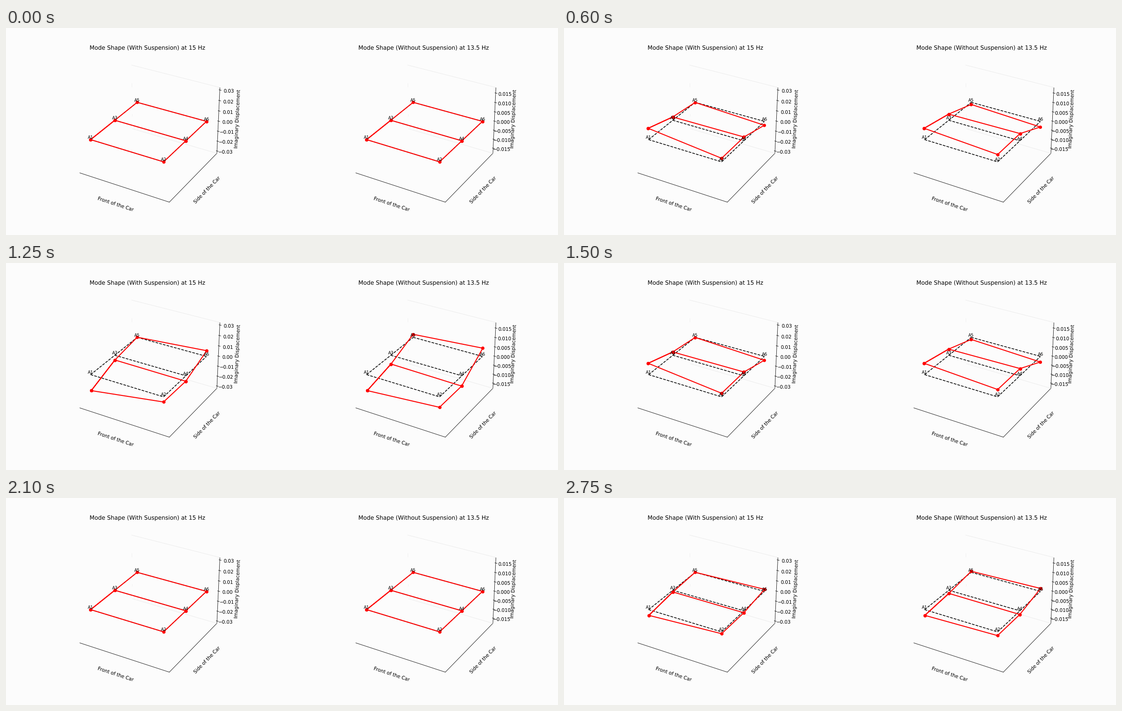
Recreate the animation shown at these times as a matplotlib script. Size 1222 by 458 pixels, loop 2.8 s.

```python
import numpy as np
import matplotlib.pyplot as plt
from matplotlib.animation import FuncAnimation

DPI = 76.375
BACK = "#fcfcfc"
FRAMES, PERIOD = 56, 28

# Unhinted glyphs keep their true advance widths at this low resolution
plt.rcParams.update({"font.family": "DejaVu Sans",
                     "text.hinting": "no_hinting"})

# Sensor grid: A1..A6, two per row from front to back
X = np.array([0, 1, 0, 1, 0, 1])
Y = np.array([0, 0, 1, 1, 2, 2])
FRAME_PATH = [0, 1, 3, 2, 0, 2, 4, 5, 3]
REST_EDGES = [(0, 1), (2, 3), (4, 5), (0, 2), (1, 3), (2, 4), (3, 5)]

# title, shape, z limit, tick step
MODES = [
    ("Mode Shape (With Suspension) at 15 Hz",
     [0.0249, 0.0077, 0.0075, 0.0084, -0.0002, -0.0089], 0.0324, 0.01),
    ("Mode Shape (Without Suspension) at 13.5 Hz",
     [0.01375, 0.0087, 0.0077, 0.0088, -0.0027, -0.0071], 0.0179, 0.005),
]


def padded(lo, hi):
    pad = (hi - lo) / 48
    return lo - pad, hi + pad


def draw_back_edges(ax, xlim, y, zmax):
    def edge(xs, zs, color):
        ax.plot(xs, [y, y], zs, color=color, lw=0.8, zorder=0)

    for z in (-zmax, zmax):
        edge(xlim, [z, z], "#e9e9e9")
    for top, bottom in ((0.44, 0.33), (-0.53, -0.59)):
        edge([xlim[0]] * 2, [top * zmax, bottom * zmax], "#eeeeee")


def make_axes(fig, col, title, zmax, step):
    ax = fig.add_axes((0.0625 + 0.5 * col, 0.11, 0.3875, 0.77),
                      projection="3d", facecolor="none")
    ax.view_init(elev=30, azim=-60)
    ax.set_title(title)
    ax.set_xlabel("Front of the Car")
    ax.set_ylabel("Side of the Car")
    ax.set_zlabel("Imaginary Displacement")
    ax.grid(False)
    for axis in (ax.xaxis, ax.yaxis, ax.zaxis):
        axis.set_pane_color((1, 1, 1, 0))

    xlim, ylim = padded(-0.1, 1.1), padded(-0.1, 2.1)
    draw_back_edges(ax, xlim, ylim[1], zmax)
    for a, b in REST_EDGES:
        ax.plot([X[a], X[b]], [Y[a], Y[b]], [0, 0], "k--", lw=1.5)
    for i in range(len(X)):
        ax.text(X[i], Y[i], 0, f"A{i + 1}", fontsize=9,
                ha="center", va="bottom")
    line, = ax.plot(X[FRAME_PATH], Y[FRAME_PATH], np.zeros(len(FRAME_PATH)),
                    "ro-", lw=2)

    ax.set_xticks([])
    ax.set_yticks([])
    ax.set_zticks(np.arange(-3, 4) * step)
    ax.set_xlim(*xlim)
    ax.set_ylim(*ylim)
    ax.set_zlim(-zmax, zmax)
    return line


fig = plt.figure(figsize=(16, 6), dpi=DPI, facecolor=BACK)
parts = [(make_axes(fig, col, title, zmax, step), np.array(shape))
         for col, (title, shape, zmax, step) in enumerate(MODES)]


def update(i):
    swing = np.sin(2 * np.pi * i / PERIOD)
    for line, shape in parts:
        z = shape * swing
        line.set_data_3d(X[FRAME_PATH], Y[FRAME_PATH], z[FRAME_PATH])
    return [line for line, _ in parts]


anim = FuncAnimation(fig, update, frames=FRAMES, interval=50,
                     repeat=True, repeat_delay=0, blit=False)
plt.show()
```
